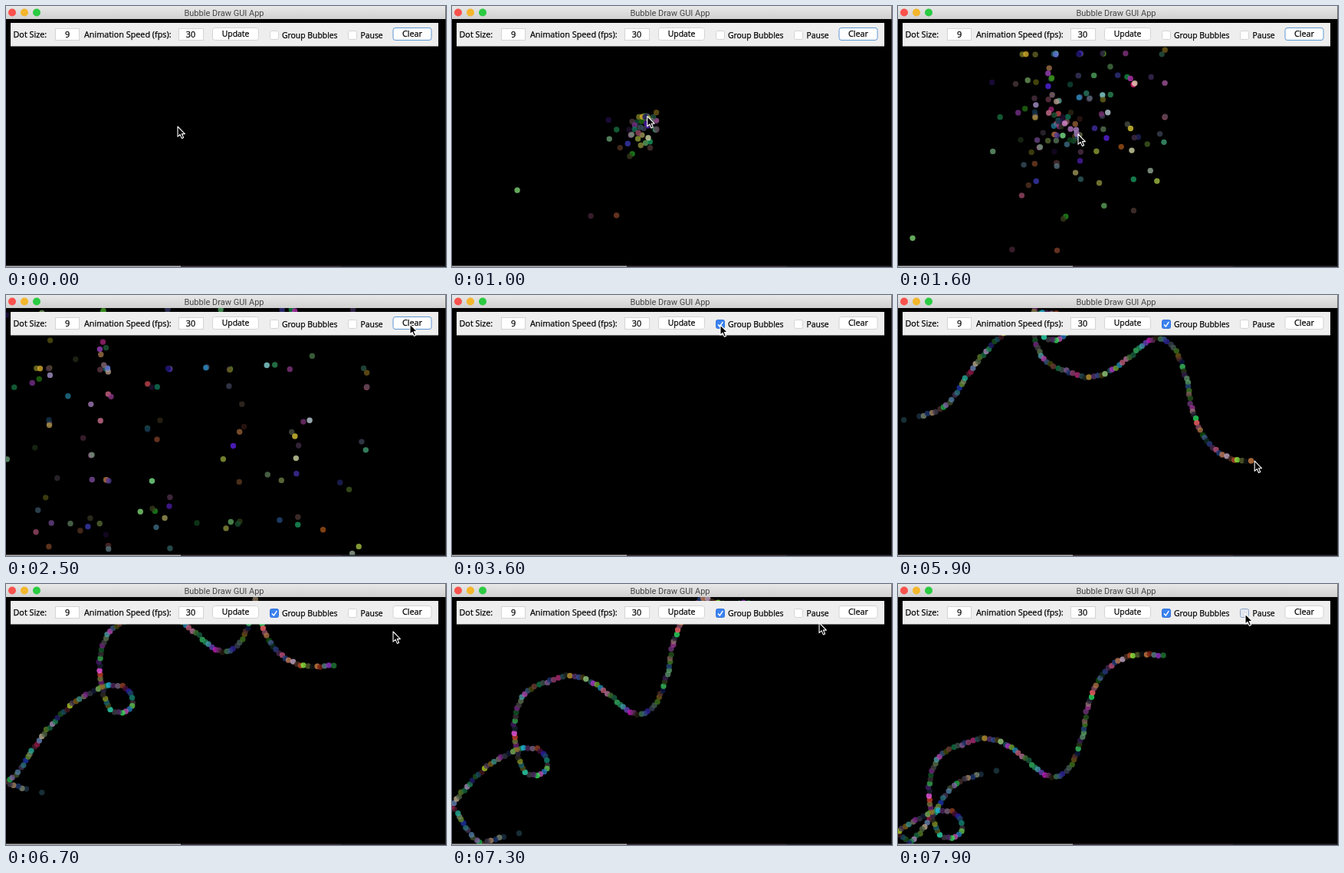
An HTML page for the animation above (8000 ms loop, 574 by 340 pixels).

```html
<!DOCTYPE html>
<html lang="en">
<head>
<meta charset="utf-8">
<title>Bubble Draw GUI App</title>
<style>
html, body { margin: 0; width: 100%; height: 100%; overflow: hidden; background: #000; }
svg { display: block; width: 100%; height: 100%; }
.ui text { font-family: "Open Sans", "Noto Sans", sans-serif; fill: #000; stroke: #000; stroke-width: .25px; }
.ui .title { font-family: Roboto, sans-serif; font-size: 11px; fill: #454545; stroke: none; }
.box { fill: #fff; stroke: #d4d4d4; }
</style>
</head>
<body>
<svg viewBox="0 0 574 340">
  <defs>
    <linearGradient id="bar" x2="0" y2="1">
      <stop offset="0" stop-color="#e8e8e8"/><stop offset="1" stop-color="#d0d0d0"/>
    </linearGradient>
    <!-- the drawn line, in a frame that travels with the group -->
    <path id="line" d="M62-18C100-10 118-4 130 16C146 43 178 98 235 119C262 129 276 112 275 98
      C274 86 248 78 240 98C236 108 232 126 231 146C230 176 238 200 282 210
      C305 224 330 210 345 199C362 186 376 168 390 165C412 164 428 196 434 235C442 290 466 338 541 322"/>
  </defs>
  <rect width="574" height="340"/>
  <g id="bubbles"></g>
  <rect y="338.5" width="228" height="1.5" fill="#b5b0b4"/>
  <rect x="228" y="338.5" width="209" height="1.5" fill="#40343c"/>
  <rect x="437" y="338.5" width="137" height="1.5" fill="#2c2a30"/>
  <rect x="573" y="17" width="1" height="322" fill="#2e2e2e"/>
  <g class="ui">
    <rect width="573.5" height="17" fill="url(#bar)"/>
    <circle cx="8" cy="8.5" r="5" fill="#f9524d"/>
    <circle cx="24" cy="8.5" r="5" fill="#f3b62c"/>
    <circle cx="40" cy="8.5" r="5" fill="#2bcb42"/>
    <text class="title" x="284.5" y="13" text-anchor="middle">Bubble Draw GUI App</text>
    <rect x="6" y="22" width="558" height="30.5" fill="#eee"/>
    <rect class="box" x="64.5" y="29.5" width="31" height="15"/>
    <rect class="box" x="225.5" y="29.5" width="32" height="15"/>
    <rect class="box" x="269.5" y="28.5" width="60" height="16" rx="3"/>
    <rect class="box" id="clear" x="505" y="28.5" width="50" height="16" rx="3"/>
    <rect class="box" id="group" x="344.5" y="32.5" width="11" height="11" rx="2"/>
    <path id="tick" d="M347 38.5l2.3 2.6 4-6" fill="none" stroke="#fff" stroke-width="1.5"/>
    <rect class="box" id="pause" x="446.5" y="32.5" width="11" height="11" rx="2"/>
    <text x="9.5" y="41" font-size="10.8">Dot Size:</text>
    <text x="80" y="41" font-size="10.8" text-anchor="middle">9</text>
    <text x="102" y="41" font-size="10.8">Animation Speed (fps):</text>
    <text x="241" y="41" font-size="10.8" text-anchor="middle">30</text>
    <text x="299.5" y="40.3" font-size="10.4" text-anchor="middle">Update</text>
    <text x="360" y="41.6" font-size="10.4">Group Bubbles</text>
    <text x="462.5" y="41.6" font-size="10.4">Pause</text>
    <text x="530" y="40.3" font-size="10.8" text-anchor="middle">Clear</text>
  </g>
  <path id="cursor" d="M0 0V13.2L3.1 10.4 5.3 15.4 7.6 14.4 5.4 9.6H9.4Z" fill="#000" stroke="#fff" stroke-width="1.1" stroke-linejoin="round"/>
</svg>
<script>
const $ = id => document.getElementById(id);
const LOOP = 8, STEP = 0.1;
const UNIT = 68;                                 // px per second
const GROUP_V = [-UNIT, -2 * UNIT];
const FIRST = 0.2, SCRIBBLE = 0.77, SCRIBBLED = 1.6, CLEARED = 2.6;
const GROUPED = 3.4, DRAW = 4, LINE_AT = 5.1, DRAWN = 5.95, PRESSED = 7.85;

let seed = 41;
function rnd() {
  seed = seed + 0x6D2B79F5 | 0;
  let n = Math.imul(seed ^ seed >>> 15, 1 | seed);
  n = n + Math.imul(n ^ n >>> 7, 61 | n) ^ n;
  return ((n ^ n >>> 14) >>> 0) / 4294967296;
}

// Pointer stops outside the two drawing strokes: time, x, y
const stops = [
  [FIRST, 224, 157], [SCRIBBLE, 235, 167], [1.9, 250, 164], [2.5, 527, 38], [2.8, 530, 37],
  [3.35, 350, 39], [3.6, 350, 39], [3.7, 224, 98], [DRAW, 137, 132],
  [DRAWN, 483, 206], [6.3, 546, 122], [6.7, 505, 62], [7.9, 453, 39]
];

function travel(t) {
  const next = stops.findIndex(s => s[0] > t);
  if (next < 1) return stops[next ? stops.length - 1 : 0].slice(1);
  const a = stops[next - 1], b = stops[next], u = (t - a[0]) / (b[0] - a[0]);
  return [1, 2].map(k => a[k] + (b[k] - a[k]) * u);
}

function scribble(t) {
  const turn = 2 * Math.PI * (t - SCRIBBLE) / (SCRIBBLED - SCRIBBLE);
  return [235 + 20 * Math.sin(turn), 147 + 20 * Math.cos(turn)];
}

const line = $('line'), lineLength = line.getTotalLength();
function drawLine(t) {
  const p = line.getPointAtLength(lineLength * (t - DRAW) / (DRAWN - DRAW));
  return [p.x + GROUP_V[0] * (t - LINE_AT), p.y + GROUP_V[1] * (t - LINE_AT)];
}

function pointer(t) {
  if (t >= SCRIBBLE && t <= SCRIBBLED) return scribble(t);
  if (t >= DRAW && t <= DRAWN) return drawLine(t);
  return travel(t);
}

// Reflects a straight run between two walls
function bounce(p, lo, hi) {
  const w = hi - lo, q = (((p - lo) % (2 * w)) + 2 * w) % (2 * w);
  return lo + (q > w ? 2 * w - q : q);
}

const bubbles = [];
function bubble(born, dies, [vx, vy], jitter = 0) {
  const [x, y] = pointer(born).map(p => p + jitter * (rnd() - 0.5));
  const light = 0.25 + 0.75 * rnd();
  const rgb = [0, 0, 0].map(() => Math.round((30 + 225 * rnd()) * light));
  const el = document.createElementNS('http://www.w3.org/2000/svg', 'circle');
  el.setAttribute('r', 3.7);
  el.setAttribute('fill', `rgb(${rgb})`);
  el.setAttribute('fill-opacity', 0.8);
  $('bubbles').append(el);
  bubbles.push({ born, dies, x, y, vx, vy, el });
}

// Free bubbles take one of six speeds per axis, so they spread as a grid
const speed = () => UNIT * (Math.floor(rnd() * 6) * 0.8 - 2);
for (let i = 0; i < 3; i++) bubble(FIRST, CLEARED, [-3 * UNIT * rnd(), 3 * UNIT * rnd()]);
for (let i = 0; i < 140; i++) {
  const born = SCRIBBLE + (SCRIBBLED - SCRIBBLE) * Math.pow(rnd(), 1.3);
  bubble(born, CLEARED, [speed(), speed()]);
}

bubble(DRAW, LOOP, GROUP_V);
for (let t = DRAW + 0.05; t <= DRAWN; t += 0.0125) bubble(t, LOOP, GROUP_V, 2.4);

function paint(id, fill, stroke) {
  $(id).style.fill = fill;
  $(id).style.stroke = stroke;
}

function render(t) {
  for (const b of bubbles) {
    const age = t - b.born, shown = age >= 0 && t < b.dies;
    b.el.style.display = shown ? '' : 'none';
    if (!shown) continue;
    b.el.setAttribute('cx', bounce(b.x + b.vx * age, 0, 574).toFixed(2));
    b.el.setAttribute('cy', bounce(b.y + b.vy * age, 18, 339).toFixed(2));
  }
  const grouped = t >= GROUPED, pressed = t >= PRESSED;
  paint('clear', '#fff', grouped ? '#d4d4d4' : '#5f97d3');
  paint('group', grouped ? '#3b82ef' : '#fff', grouped ? '#3474dc' : '#d4d4d4');
  paint('pause', pressed ? '#e3e8f0' : '#fff', pressed ? '#8ba6cb' : '#d4d4d4');
  $('tick').style.display = grouped ? '' : 'none';
  $('cursor').setAttribute('transform', `translate(${pointer(t).map(p => p.toFixed(2))})`);
}

const start = performance.now();
function tick() {
  const t = ((performance.now() - start) / 1000) % LOOP;
  render(Math.floor(t / STEP + 1e-6) * STEP);    // ten pictures a second
  requestAnimationFrame(tick);
}
tick();
</script>
</body>
</html>
```
